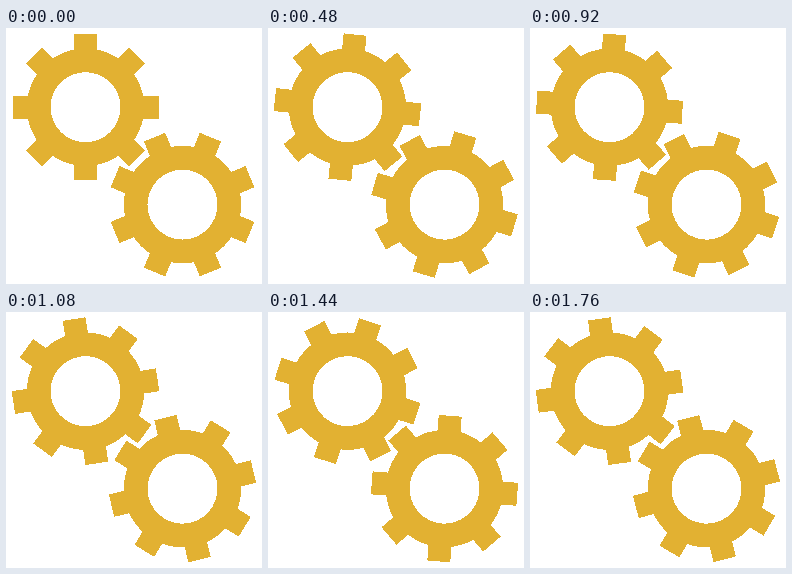
These frames come from a looping animation (256x256 px, 1800 ms). An HTML page:

```html
<!DOCTYPE html>
<html lang="en">
<head>
<meta charset="utf-8">
<title>Gears</title>
<style>
  html, body { margin: 0; width: 100%; height: 100%; overflow: hidden; background: #fff; }
  svg { display: block; width: 256px; height: 256px; }
</style>
</head>
<body>
<svg viewBox="0 0 256 256" shape-rendering="crispEdges">
  <defs>
    <g id="gear" fill="#e2b132">
      <circle r="58.7"/>
      <g id="teeth"></g>
      <circle r="35" fill="#fff"/>
    </g>
  </defs>
  <use id="upper" href="#gear"/>
  <use id="lower" href="#gear"/>
</svg>
<script>
  const LOOP = 1800, STEP = 40;
  const TEETH = 8, PITCH = 360 / TEETH;
  const byId = id => document.getElementById(id);
  const upper = byId('upper'), lower = byId('lower');

  byId('teeth').innerHTML = Array.from({ length: TEETH }, (_, i) =>
    `<rect x="-11.5" y="-73" width="23" height="30" transform="rotate(${i * PITCH})"/>`
  ).join('');

  function place(gear, x, y, angle) {
    gear.setAttribute('transform', `translate(${x} ${y}) rotate(${angle})`);
  }

  // One full turn per loop, in opposite directions, advancing in 40 ms steps.
  function draw(ms) {
    const t = Math.floor((ms % LOOP + 0.5) / STEP) * STEP;
    const turn = t / LOOP * 360;
    place(upper, 79.5, 79.2, turn);
    place(lower, 176.5, 176.6, PITCH / 2 - turn);
  }

  function tick(now) {
    draw(now);
    requestAnimationFrame(tick);
  }

  draw(0);
  requestAnimationFrame(tick);
</script>
</body>
</html>
```
